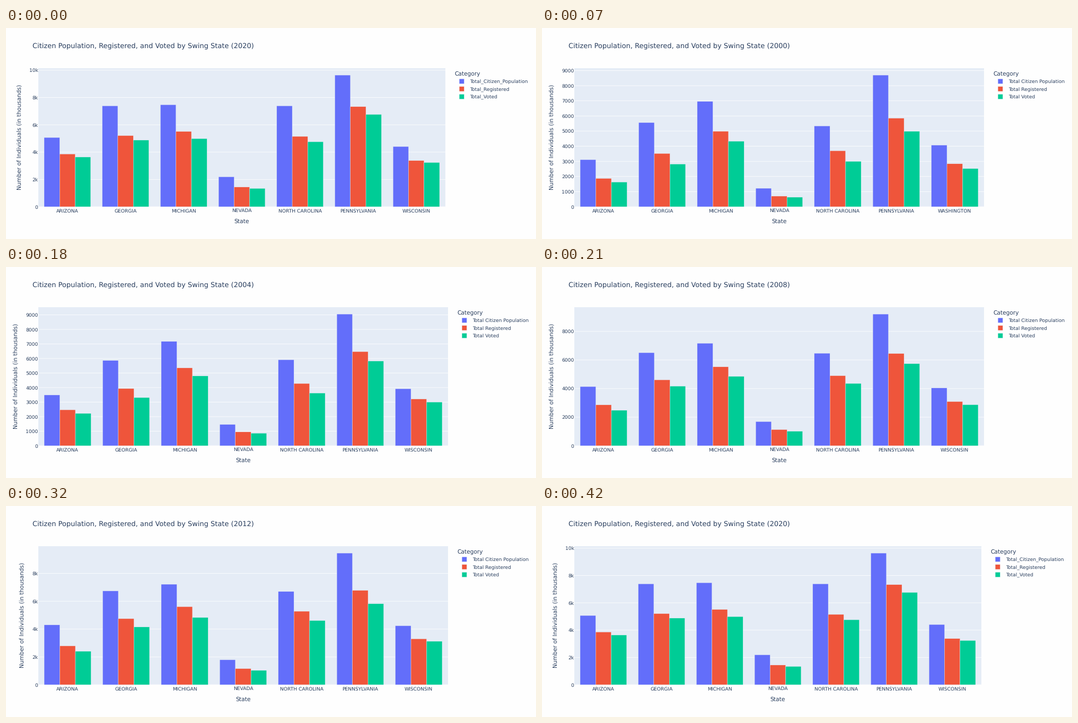
Recreate the animation shown at these times as a matplotlib script. Size 1000 by 399 pixels, loop 0.49 s.

```python
import matplotlib.pyplot as plt
from matplotlib.animation import FuncAnimation
from matplotlib.patches import Rectangle

W, H, DPI = 1000, 399, 100
PX = 72 / DPI                       # points per pixel
LEFT, TOP, BOTTOM = 61, 76, 338
INK, PLOT_BG, PAGE = "#2a3f5f", "#e5ecf6", "#fefefe"
COLORS = ("#636efa", "#ef553b", "#00cc96")
NAMES = ("Total Citizen Population", "Total Registered", "Total Voted")
STATES = ["ARIZONA", "GEORGIA", "MICHIGAN", "NEVADA",
          "NORTH CAROLINA", "PENNSYLVANIA", "WISCONSIN"]

# Per year and state: citizens, registered, voted (millions)
DATA = {
    2000: [(3.11, 1.87, 1.63), (5.56, 3.52, 2.82), (6.96, 4.99, 4.33),
           (1.22, 0.70, 0.63), (5.34, 3.70, 3.00), (8.70, 5.85, 4.99),
           (4.07, 2.84, 2.52)],
    2004: [(3.49, 2.47, 2.22), (5.86, 3.93, 3.31), (7.17, 5.35, 4.80),
           (1.46, 0.95, 0.86), (5.91, 4.28, 3.62), (9.05, 6.47, 5.82),
           (3.92, 3.21, 3.00)],
    2008: [(4.14, 2.86, 2.48), (6.51, 4.61, 4.17), (7.17, 5.52, 4.85),
           (1.69, 1.13, 1.01), (6.47, 4.90, 4.36), (9.21, 6.45, 5.74),
           (4.04, 3.09, 2.87)],
    2012: [(4.30, 2.79, 2.40), (6.74, 4.75, 4.15), (7.22, 5.61, 4.83),
           (1.79, 1.16, 1.03), (6.70, 5.28, 4.61), (9.46, 6.78, 5.82),
           (4.24, 3.30, 3.12)],
    2016: [(4.58, 3.14, 2.76), (7.05, 4.88, 4.24), (7.33, 5.42, 4.70),
           (1.96, 1.36, 1.18), (6.96, 5.18, 4.69), (9.61, 6.90, 6.00),
           (4.34, 3.31, 3.05)],
    2020: [(5.07, 3.86, 3.64), (7.39, 5.21, 4.88), (7.47, 5.51, 4.99),
           (2.19, 1.44, 1.34), (7.39, 5.15, 4.76), (9.64, 7.33, 6.76),
           (4.41, 3.38, 3.24)],
}
SEQUENCE = [2020, 2000, 2004, 2008, 2012, 2016, 2020]

plt.rcParams["font.family"] = "DejaVu Sans"
plt.rcParams["text.hinting"] = "none"
fig = plt.figure(figsize=(W / DPI, H / DPI), dpi=DPI, facecolor=PAGE)
ax = fig.add_axes([0, 0, 1, 1])


def label(x, y, text, size, ha="left", **kw):
    ax.text(x, y, text, fontsize=size * PX, color=INK, ha=ha,
            va="baseline", **kw)


def box(x, y, w, h, color, edge=0):
    ax.add_patch(Rectangle((x, y), w, h, fc=color, ec=PLOT_BG if edge else "none",
                           lw=edge * PX, snap=False, zorder=2))


def draw_axes(year, right, top_value):
    box(LEFT, TOP, right - LEFT, BOTTOM - TOP, PLOT_BG)
    short = year >= 2012
    step = 1 if year < 2008 else 2
    for v in range(0, int(top_value) + 1, step):
        y = BOTTOM - v / top_value * (BOTTOM - TOP)
        ax.plot([LEFT, right], [y, y], color="white", lw=0.8 * PX,
                solid_capstyle="butt", snap=False, zorder=2)
        text = "0" if v == 0 else f"{v}k" if short else str(v * 1000)
        label(60.5, y + 3.4, text, 9.2, "right")
    title_x = 22 if not short else 34 if top_value < 10 else 28.5
    label(title_x, 206.5, "Number of Individuals (in thousands)", 10.7, "center",
          rotation=90, rotation_mode="anchor")
    label((LEFT + right) / 2, 369, "State", 10.7, "center")


def draw_bars(year, right, top_value):
    slot = (right - LEFT) / len(STATES)
    bar = slot * 0.8 / 3
    for k, color in enumerate(COLORS):
        for i, row in enumerate(DATA[year]):
            h = row[k] / top_value * (BOTTOM - TOP)
            box(LEFT + slot * (i + 0.1) + bar * k, BOTTOM - h, bar, h, color, 0.4)
    for i, state in enumerate(STATES):
        if year == 2000 and state == "WISCONSIN":
            state = "WASHINGTON"
        label(LEFT + slot * (i + 0.5), 348.4, state, 9.2, "center")


def draw_legend(year, right):
    x = right + 17
    label(x, 90, "Category", 10.6)
    for k, (name, color) in enumerate(zip(NAMES, COLORS)):
        y = 100.8 + 14.5 * k
        box(x + 9.2, y - 4.6, 9.2, 9.2, color, 0.4)
        if year == 2020:
            name = name.replace(" ", "_")
        label(x + 28.8, y + 3.4, name, 9.15)


def draw(i):
    year = SEQUENCE[i]
    right = 829 if year == 2020 else 834
    top_value = max(map(max, DATA[year])) / 0.95
    ax.clear()
    ax.set(xlim=(0, W), ylim=(H, 0))
    ax.axis("off")
    label(50, 38, "Citizen Population, Registered, and Voted by Swing State "
          f"({year})", 13)
    draw_axes(year, right, top_value)
    draw_bars(year, right, top_value)
    draw_legend(year, right)
    return []


anim = FuncAnimation(fig, draw, frames=len(SEQUENCE), init_func=lambda: [],
                     interval=70, repeat=True, repeat_delay=0)
plt.show()
```
